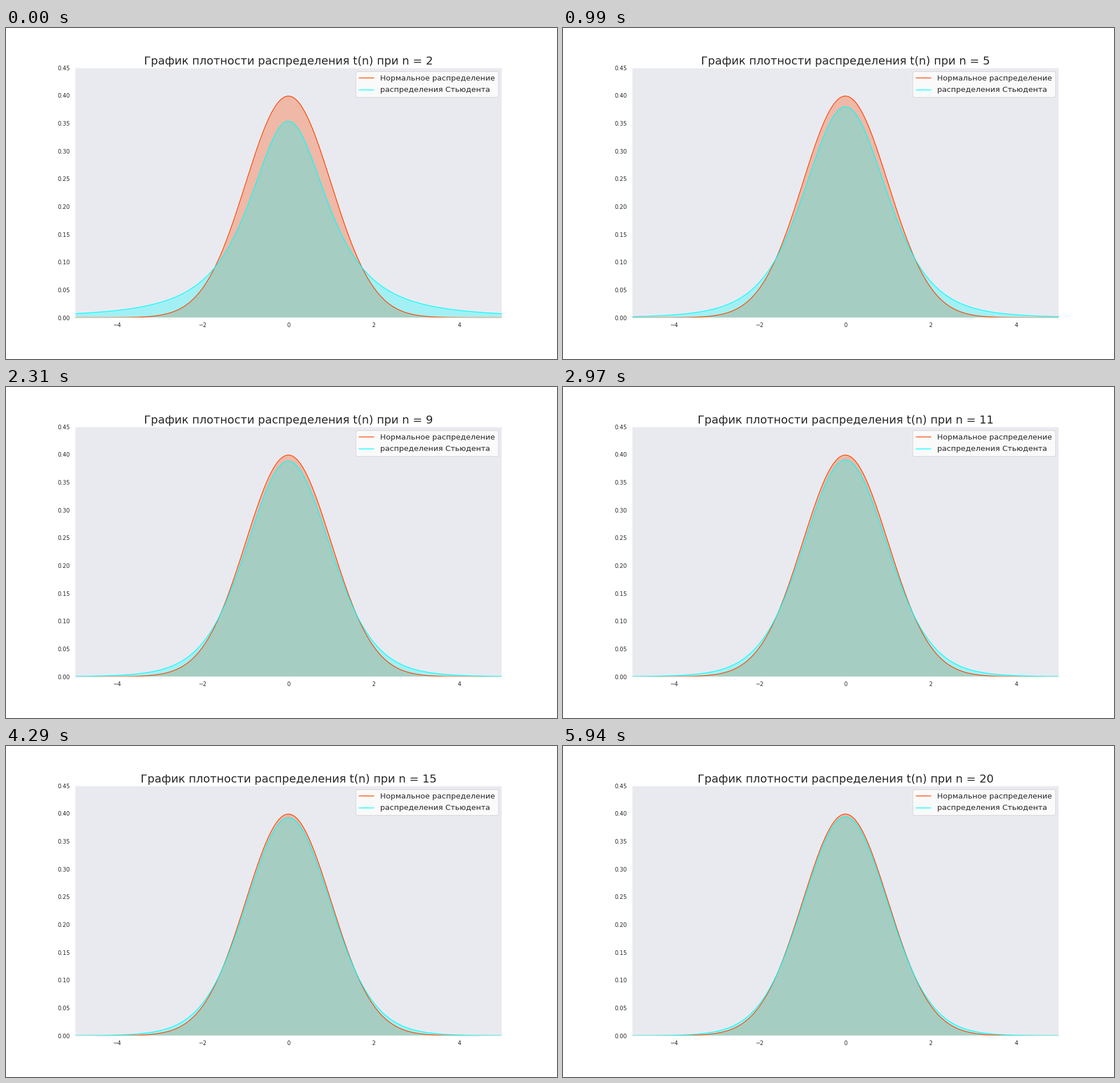
A matplotlib script for the animation above (6.27 s loop, 966x580 px).

```python
import math

import numpy as np
import matplotlib.pyplot as plt
from matplotlib.animation import FuncAnimation

WIDTH, HEIGHT, DPI = 966, 580, 64
SCALE = WIDTH / (15 * DPI)  # layout is designed for a 15-inch-wide figure
INTERVAL = 330
DEGREES = range(2, 21)
INK = "0.15"
NORMAL, STUDENT = "orangered", "cyan"


def normal_pdf(x):
    return np.exp(-x**2 / 2) / math.sqrt(2 * math.pi)


def student_pdf(x, n):
    norm = math.gamma((n + 1) / 2) / (math.sqrt(n * math.pi) * math.gamma(n / 2))
    return norm * (1 + x**2 / n) ** (-(n + 1) / 2)


def draw_density(ax, x, y, color, label):
    fill = ax.fill_between(x, y, color=color, alpha=0.3, linewidth=0, clip_on=False)
    line, = ax.plot(x, y, color=color, linewidth=1.5 * SCALE, label=label,
                    solid_capstyle="butt", clip_on=False)
    return line, fill


plt.rcParams.update({
    "font.family": "DejaVu Sans",
    "text.color": INK,
    "legend.facecolor": "inherit",
    "legend.edgecolor": "0.8",
    "patch.linewidth": SCALE,
})

fig = plt.figure(figsize=(WIDTH / DPI, HEIGHT / DPI), dpi=DPI, facecolor="white")
ax = fig.add_axes([0.125, 0.125, 0.775, 0.755], facecolor="#E9EAF0")
ax.patch.set_snap(False)

# White borders sit half a unit right of and below the plot's edges.
for side, spine in ax.spines.items():
    shift = 0.5 if side in ("right", "bottom") else -0.5
    spine.set_position(("outward", shift * SCALE))
    spine.set(color="white", linewidth=1.25 * SCALE, snap=False)

ax.set(xlim=(-5, 5), ylim=(0, 0.45))
ax.set_xticks(range(-4, 5, 2))
ax.set_yticks(np.arange(0, 0.46, 0.05))
ax.yaxis.set_major_formatter("{x:.2f}")
ax.tick_params(length=0, pad=9.5 * SCALE, labelsize=11 * SCALE, labelcolor=INK)

x = np.linspace(-5, 5, 1000)
draw_density(ax, x, normal_pdf(x), NORMAL, "Нормальное распределение")
curve, area = draw_density(ax, x, student_pdf(x, DEGREES[0]), STUDENT,
                           "распределения Стьюдента")
ax.legend(loc="upper right", fontsize=15 * SCALE, labelspacing=0.58)
title = ax.set_title("", fontsize=22.1 * SCALE, pad=6 * SCALE)


def update(frame):
    n = DEGREES[frame]
    y = student_pdf(x, n)
    curve.set_ydata(y)
    outline = np.column_stack([x, y])
    area.set_verts([np.vstack([[x[0], 0], outline, [x[-1], 0]])])
    title.set_text(f"График плотности распределения t(n) при n = {n}")
    return curve, area, title


anim = FuncAnimation(fig, update, frames=len(DEGREES), interval=INTERVAL,
                     repeat=True, repeat_delay=0, blit=False)
plt.show()
```
